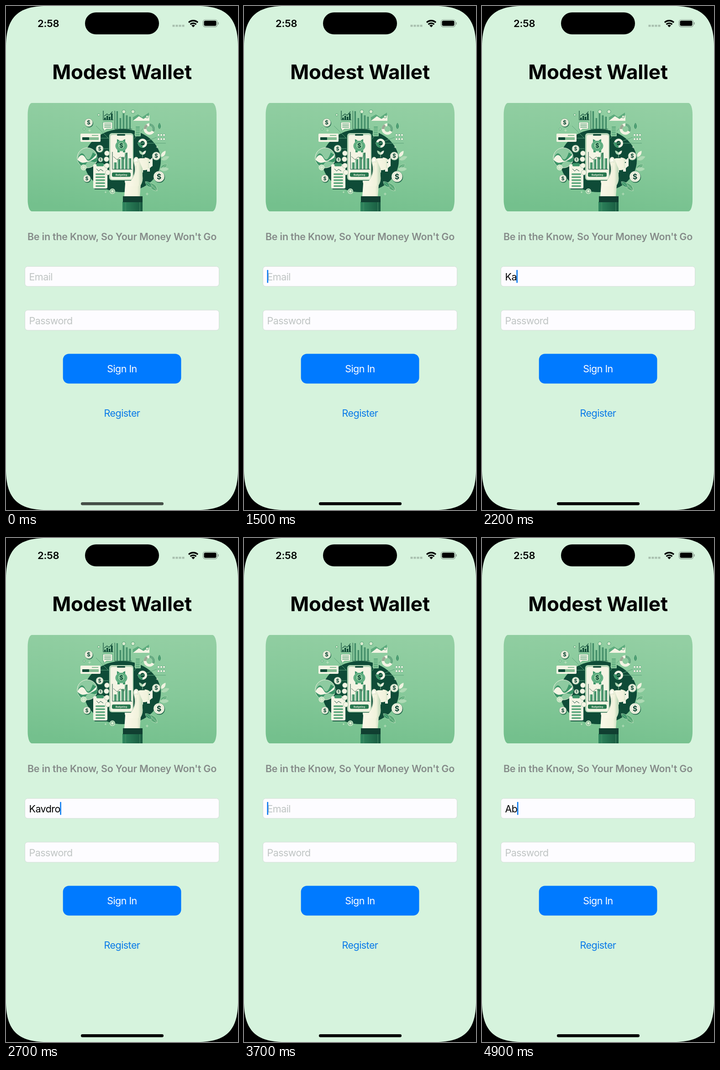
An HTML page for the animation above (5.1 s loop, 508x1102 px).

```html
<!DOCTYPE html>
<html lang="en">
<head>
<meta charset="utf-8">
<title>Sign in</title>
<style>
html, body { margin: 0; height: 100%; overflow: hidden; background: #000; }
svg { display: block; width: 100vw; height: 100vh; }
text { font: 400 21.5px Inter, sans-serif; letter-spacing: -.026em; }
.title { font-size: 44px; font-weight: 700; letter-spacing: -.004em; }
.tagline { font-weight: 600; letter-spacing: -.011em; fill: #858b89; }
.clock { font-size: 22px; font-weight: 600; letter-spacing: -.01em; }
.menu text { font-size: 18px; }
.menu { filter: drop-shadow(0 9px 13px rgba(0, 60, 25, .17)); }
.hint { fill: #bfc4c3; }
.mid { text-anchor: middle; }
.art text { font-weight: 700; letter-spacing: 0; text-anchor: middle; }
.field { fill: #fdfcff; stroke: #d5ddd8; }
</style>
</head>
<body>
<svg viewBox="0 0 508 1102" preserveAspectRatio="none">
  <defs>
    <linearGradient id="backdrop" x1=".6" y1="0" x2=".4" y2="1">
      <stop stop-color="#93cfa3"/><stop offset=".5" stop-color="#86c99a"/><stop offset="1" stop-color="#74c08d"/>
    </linearGradient>
    <linearGradient id="skin"><stop stop-color="#faf8e8"/><stop offset=".7" stop-color="#f1f2dc"/><stop offset="1" stop-color="#b9d5b4"/></linearGradient>
    <linearGradient id="bar"><stop stop-color="#8ccaa0"/><stop offset="1" stop-color="#267653"/></linearGradient>
    <linearGradient id="sleeve"><stop stop-color="#2f875e"/><stop offset="1" stop-color="#17593f"/></linearGradient>
    <clipPath id="frame"><rect x="47.5" y="212" width="413.5" height="237" rx="9" ry="25"/></clipPath>
  </defs>
  <rect width="508" height="1102"/>
  <path fill="#d6f3dd" d="M0 88C0 26 26 0 88 0H420C482 0 508 26 508 88V1014C508 1076 482 1102 420 1102H88C26 1102 0 1076 0 1014Z"/>

  <text class="clock" x="69" y="46">2:58</text>
  <rect x="173" y="14" width="162" height="48" rx="24"/>
  <path stroke="#a9c0af" stroke-width="4.5" stroke-dasharray="5 2" d="M364.5 43.2h26"/>
  <g fill="none" stroke="#000" stroke-width="3.3">
    <path d="M400 36a14.5 14.5 0 0 1 20 0M403.6 40.2a9.2 9.2 0 0 1 12.8 0"/>
    <path fill="#000" stroke="none" d="M406 42.6a6 6 0 0 1 8 0l-4 4z"/>
    <rect x="431.5" y="30" width="31" height="15.6" rx="4.6" stroke="#819286" stroke-width="1.2"/>
    <rect x="433.5" y="32" width="27" height="11.6" rx="3" fill="#000" stroke="none"/>
    <path d="M464.8 35.5v5" stroke="#819286" stroke-width="1.6"/>
  </g>

  <text class="title mid" x="254" y="160">Modest Wallet</text>
  <g class="art" id="art" clip-path="url(#frame)"></g>
  <text class="tagline mid" x="254" y="512">Be in the Know, So Your Money Won't Go</text>

  <rect class="field" x="41.5" y="569.5" width="425" height="43.5" rx="6"/>
  <rect class="field" x="41.5" y="665" width="425" height="44" rx="6"/>
  <text class="hint" id="hint" x="50.5" y="599.5">Email</text>
  <text class="hint" x="50.5" y="695.5">Password</text>
  <text id="entry" x="50.5" y="599.5"></text>
  <rect id="caret" y="577" width="2.6" height="28.5" rx="1.2" fill="#0a7aef"/>

  <rect x="124.7" y="760.5" width="258.8" height="65" rx="13" fill="#007aff"/>
  <text class="mid" x="254" y="800.5" fill="#fff">Sign In</text>
  <text class="mid" x="254" y="898" fill="#0879e8">Register</text>

  <g class="menu" id="menu">
    <path fill="#eff5f0" d="M35 511H197a12 12 0 0 1 12 12V547a12 12 0 0 1-12 12H68C63 559 59 569 55.5 569S48 559 43 559H35a12 12 0 0 1-12-12V523a12 12 0 0 1 12-12Z"/>
    <path stroke="#cfd9d2" d="M108.5 511v48"/>
    <text x="42" y="541.5">Paste</text>
    <text x="127.5" y="541.5">AutoFill</text>
  </g>
  <rect id="home" x="164" y="1085" width="181" height="6.5" rx="3.2"/>
</svg>
<script>
const $ = id => document.getElementById(id);
const CREAM = '#f4f4e4', DARK = '#0e4a36', GREEN = '#3c9568', PALE = '#a9d8b2';

const rect = (x, y, w, h, fill, rx = 0) =>
  `<rect x="${x}" y="${y}" width="${w}" height="${h}" rx="${rx}" fill="${fill}"/>`;
const disc = (x, y, r, fill, stroke = 'none', width = 1) =>
  `<circle cx="${x}" cy="${y}" r="${r}" fill="${fill}" stroke="${stroke}" stroke-width="${width}"/>`;
const oval = (x, y, rx, ry, fill) => `<ellipse cx="${x}" cy="${y}" rx="${rx}" ry="${ry}" fill="${fill}"/>`;
const path = (d, fill, stroke = 'none', width = 1) =>
  `<path d="${d}" fill="${fill}" stroke="${stroke}" stroke-width="${width}"/>`;
const line = (d, color, width = 1) => path(d, 'none', color, width);
const label = (x, y, size, words, fill) =>
  `<text x="${x}" y="${y}" fill="${fill}" style="font-size:${size}px">${words}</text>`;
const coin = (x, y, r) => disc(x + 1, y + 1.5, r, '#1d6347') + disc(x, y, r, CREAM, '#6a9e7f', .8) +
  disc(x, y, r * .74, 'none', '#b9d2b6', .7) + label(x, y + r * .48, r * 1.35, '$', DARK);
const leaf = (x, y, size, angle, fill) => `<g transform="translate(${x} ${y}) rotate(${angle}) scale(${size})">` +
  path('M0 0C-6-5-5-13 0-19C5-13 6-5 0 0Z', fill, '#d2e8c9', .5) + line('M0 0V-16', '#d2e8c9', .5) + '</g>';
const bars = (x, base, step, width, heights, fill) =>
  heights.map((h, i) => rect(x + i * step, base - h, width, h, fill)).join('');
const rows = (x, y, w, n, gap, fill, h) =>
  Array.from({ length: n }, (_, i) => rect(x, y + i * gap, w, h, fill, h / 2)).join('');

function illustration() {
  const out = [rect(47, 212, 415, 238, 'url(#backdrop)')];
  const add = (...parts) => out.push(...parts);

  add(oval(255, 338, 84, 69, '#0f4b37'));
  add(line('M197 262L226 291M206 289H226M211 312H226M279 292L300 268M278 284L289 272M287 300H350M296 300L330 287', '#5fa47c'));

  // charts and notes above the phone
  add(bars(215, 249, 5, 3.5, [5, 9, 7, 14], DARK), line('M213 229V249H235M215 241L221 236L226 239L233 231', DARK, 1.2));
  add(bars(240, 269, 7, 5, [39, 24, 34, 30, 27], 'url(#bar)'), line('M238 229V269H276', DARK, .8));
  add(path('M278 251V243L289 237L298 243L313 233V251Z', '#5dac7e'), path('M278 251L291 241L301 247L314 239V251Z', CREAM));
  add(path('M212 254H233V269H220L214 274V269H212Z', CREAM, GREEN, .8), rows(215, 257.5, 15, 3, 3.5, GREEN, 1.2));
  add(rect(282, 261, 13, 24, '#8ecb9e', 1), rows(284, 264, 9, 5, 4.2, GREEN, 1.4));
  for (const [x, y, r] of [[203, 238, 2.5], [258, 231, 4], [278, 231, 4], [171, 269, 2], [309, 242, 3]])
    add(disc(x, y, r, '#d9ebcf', GREEN, .8));

  // donuts and dot grid
  add(disc(314, 269, 9.5, 'none', CREAM, 6), line('M314 259.5A9.5 9.5 0 0 1 322 274', '#68ac83', 6),
    line('M304.5 269A9.5 9.5 0 0 1 309 261', '#9aa994', 6));
  add(disc(299, 300, 7.5, 'none', CREAM, 5), line('M299 307.5A7.5 7.5 0 0 1 292 298', GREEN, 5));
  for (let i = 0; i < 6; i++) add(disc(334 + i % 3 * 6, 282 + (i > 2) * 9, 2.6, CREAM, GREEN, .6));

  // card, wave chart and clipboard on the left
  add(rect(163, 279, 44, 18, CREAM, 2), rect(167, 287, 36, 6, '#86bd94', 1), rect(167, 287, 15, 6, DARK, 1), rect(188, 282, 14, 2, '#86bd94'));
  add(disc(178, 332, 22, '#8ecaa0', CREAM, 1), path('M156 336C162 320 168 318 174 330S186 333 190 320L200 327V339C190 346 184 333 176 344S162 350 156 336Z', GREEN),
    path('M156 336C163 323 169 323 175 334S188 334 199 324L198 331C189 338 182 340 174 342S163 342 156 336Z', CREAM));
  add(disc(170, 353, 6.5, '#d8ebcf'), disc(170, 353, 4, 'none', PALE));
  add(rect(193, 348, 31, 53, '#175640', 3), rect(191, 346, 31, 53, CREAM, 3), rect(198, 343.5, 16, 7, GREEN, 2));
  add(line('M198 356L203 361L207 357L213 361', DARK), rows(196, 366, 21, 5, 6.5, '#5aa67b', 3.6));

  // plants
  for (const [x, y, size, angle, fill] of [
    [340, 330, .85, 35, CREAM], [341, 336, .9, 68, PALE], [338, 356, .95, 55, '#5fae7d'],
    [338, 357, .95, 88, PALE], [336, 270, .8, 0, GREEN], [331, 404, 1.35, -45, '#5aa978'], [305, 384, 1, 130, GREEN]
  ]) add(leaf(x, y, size, angle, fill));

  for (const [x, y, r] of [[181, 255, 9], [205, 312, 8], [207, 336, 5], [177, 377, 8], [329, 328, 9], [335, 373, 12]])
    add(coin(x, y, r));
  add(disc(233, 405, 6, '#d8ebcf'), disc(233, 405, 3.8, 'none', GREEN));
  add(line('M183 269v6M180 272h6M309 408v6M306 411h6M218 405v4M216 407h4M331 306v5M328.5 308.5h5', '#d8ecd0', .8));

  // piggy bank
  add(oval(302, 345, 18, 14, 'url(#skin)'), path('M313 338L321 331L321 350L314 354ZM294 356H300V364H294ZM309 355H315V362H309Z', CREAM));
  add(rect(293, 331, 11, 1.8, DARK, 1), disc(314, 342, 1.2, DARK), line('M299 331V319', PALE), leaf(299, 325, .6, -40, PALE), leaf(299, 325, .6, 40, CREAM));

  // phone in hand
  add(path('M259 418L261 388Q257 377 268 370H291L297 350L299 371Q301 383 295 392L293 418Z', 'url(#skin)'));
  add(rect(224.5, 277, 56, 105, '#15563f', 7), rect(226, 278, 53, 103, '#b7d6b8', 6), rect(229, 282, 48, 97, CREAM, 4), rect(243, 280, 18, 3.5, DARK, 1.5));
  add(path('M243 298L243 291L249 294ZM261 298L261 291L255 294ZM244 313H249V320H244ZM256 313H261V320H256Z', GREEN));
  add(oval(252.5, 306, 13, 11.5, '#62b083'), disc(252.5, 305, 8, '#8ac99b', GREEN), label(252.5, 310, 13, '$', DARK));
  add(bars(236, 357, 8, 6, [15, 22, 27, 36, 24], 'url(#bar)'), line('M233 319V357H276', DARK), line('M235 329L243 336L250 330L258 335L265 320', '#31543f', .8));
  add(rect(232, 364, 41, 9.5, '#28784f', 3), label(252.5, 370.5, 5, 'Budgeting', CREAM));
  for (const [x, y] of [[221, 322], [220, 335], [221, 349], [223, 364]])
    add(disc(x, y, 5.5, CREAM, '#8db295', .7));
  add(path('M273 383C280 372 284 362 281 347C278 337 279 331 285 330C291 330 293 343 299 355L299 380L290 394H268Z', 'url(#skin)'),
    path('M280 337C280 331 286 330 288 335L289 342C285 339 282 341 281 344Z', '#fffdf0', '#bdcfb5', .6),
    line('M284 349C285 360 281 371 275 379', '#afc9ab', .8));
  add(rect(255, 428, 44, 22, 'url(#sleeve)'), rect(256, 416, 43, 13, '#103f31'), line('M262 429V449M293 429V449', '#4b9068'));
  return out.join('');
}

const WORD = 'Kavdrom', TYPED_AT = [2000, 2200, 2300, 2400, 2500, 2700, 2800];
const LOOP = 5100;
const clamp = v => Math.max(0, Math.min(1, v));

function typedText(t) {
  if (t >= 4900) return 'Ab';
  if (t >= 4700) return 'A';
  const count = t < 3000 ? TYPED_AT.filter(at => t >= at).length : Math.max(0, 6 - Math.floor((t - 3000) / 100));
  return WORD.slice(0, count);
}

function draw(now) {
  const t = Math.floor(now % LOOP / 100) * 100;
  const text = typedText(t);
  $('entry').textContent = text;
  $('hint').style.opacity = text ? 0 : 1;
  $('caret').setAttribute('x', 50.5 + (text ? $('entry').getComputedTextLength() - .5 : 0));
  $('caret').style.opacity = t >= 1100 ? 1 : 0;
  $('menu').style.opacity = t < 2100 ? clamp((t - 1500) / 300) : 0;
  $('home').style.opacity = .68 + .32 * clamp((t - 900) / 400);
  requestAnimationFrame(draw);
}

$('art').innerHTML = illustration();
requestAnimationFrame(draw);
</script>
</body>
</html>
```
